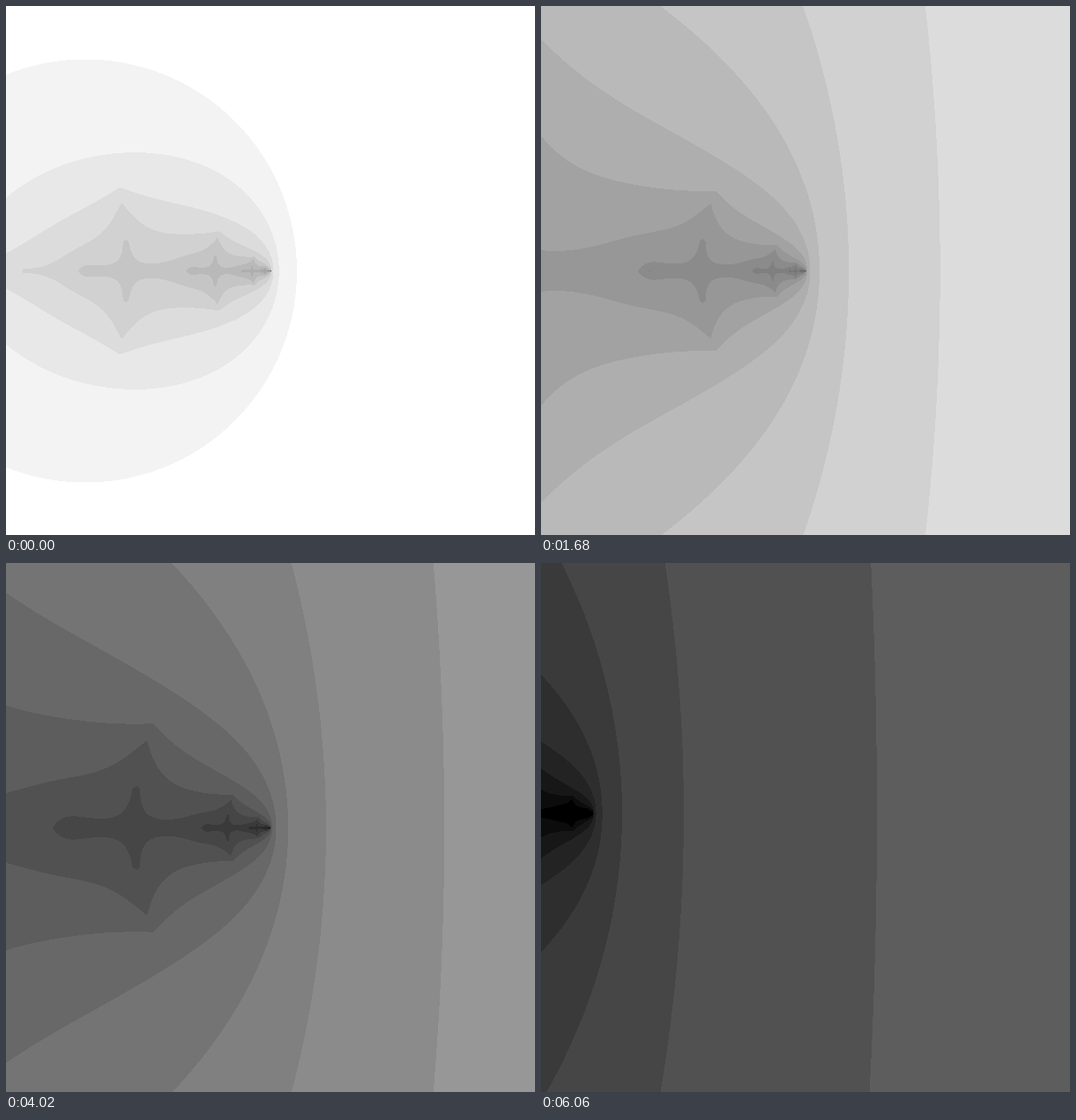
Recreate the animation shown at these times as an HTML page with a canvas. Size 600x600 px, loop 6.12 s.

```html
<!DOCTYPE html>
<html lang="en">
<head>
<meta charset="utf-8">
<title>Escape-time zoom</title>
<style>
html, body { margin: 0; width: 100%; height: 100%; overflow: hidden; background: #fff; }
canvas { display: block; width: 600px; height: 600px; }
</style>
</head>
<body>
<canvas id="stage" width="600" height="600"></canvas>
<script>
// Escape times of z -> z^2 - sqrt(z), zooming in on its repelling fixed point.
const SIZE = 600, FRAMES = 102, STEP = 60, DEPTH = 22;
const BASE_SCALE = 120, ZOOM = 1.2;
const FIXED = 1.75487766624669;
const CENTER_X = FIXED + 2.0234e-8, CENTER_Y = 1.383e-9;

const ctx = document.getElementById('stage').getContext('2d');
const image = ctx.createImageData(SIZE, SIZE);
const pixels = new Uint32Array(image.data.buffer);
const palette = Uint32Array.from({ length: DEPTH + 1 }, (_, n) => {
  const gray = Math.round(255 * (1 - n / DEPTH));
  return 0xff000000 | gray * 0x010101;
});

function escapeTime(x, y) {
  let n = 0;
  for (; n < DEPTH; n++) {
    const xx = x * x, yy = y * y, norm = xx + yy;
    if (norm > 4) break;
    // Principal square root, arranged to avoid cancellation near the real axis.
    const s = Math.sqrt((Math.sqrt(norm) + Math.abs(x)) / 2);
    const t = s ? y / (2 * s) : 0;
    const rootX = x >= 0 ? s : Math.abs(t);
    const rootY = x >= 0 ? t : y < 0 ? -s : s;
    y = 2 * x * y - rootY;
    x = xx - yy - rootX;
  }
  return n;
}

function render(frame) {
  const scale = BASE_SCALE * ZOOM ** frame, half = SIZE / 2;
  for (let py = 0, i = 0; py < SIZE; py++) {
    const y = CENTER_Y + (py - half) / scale;
    for (let px = 0; px < SIZE; px++) {
      pixels[i++] = palette[escapeTime(CENTER_X + (px - half) / scale, y)];
    }
  }
  ctx.putImageData(image, 0, 0);
}

let shown = -1;
const start = performance.now();
function tick() {
  const frame = Math.floor((performance.now() - start) / STEP) % FRAMES;
  if (frame !== shown) render(shown = frame);
  requestAnimationFrame(tick);
}
tick();
</script>
</body>
</html>
```
